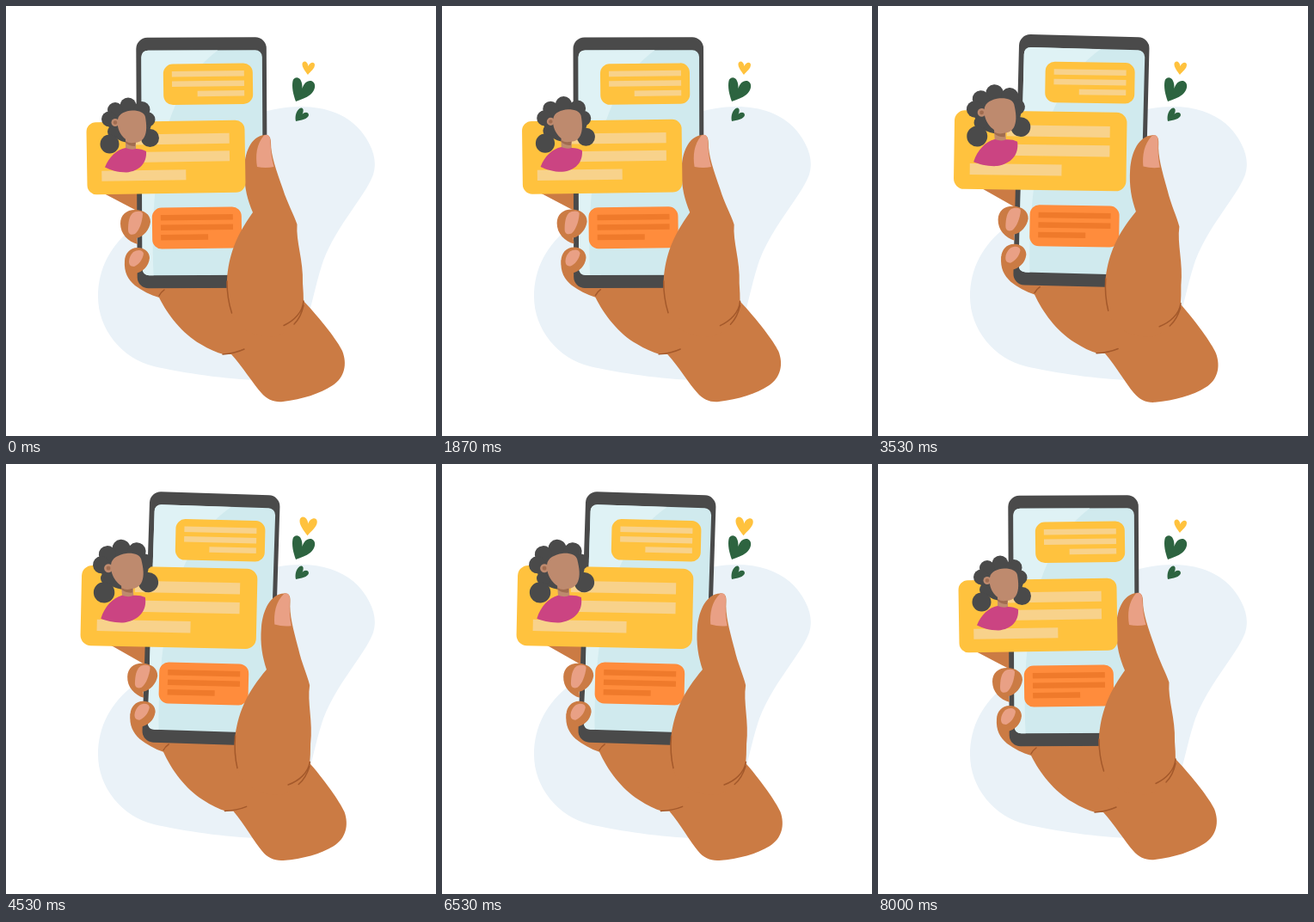
An HTML page that plays this animation: 500x500 px, repeating every 8.03 s.

```html
<!DOCTYPE html>
<html lang="en">
<head>
<meta charset="utf-8">
<title>Hand with chat phone</title>
<style>
  html, body { margin: 0; width: 100%; height: 100%; overflow: hidden; background: #fff; }
  svg { display: block; width: 100vw; height: 100vh; }
  .skin { fill: #cb7b44; }
  .nail { fill: #e9a085; }
  .line { fill: none; stroke: #a4592b; stroke-width: 1.5; stroke-linecap: round; }
  .dark { fill: #4a4a4a; }
  .yellow { fill: #ffc23e; }
  .pale { fill: #f8d28b; }
  .orange { fill: #ff8c3c; }
  .rust { fill: #ef7a2b; }
  .face { fill: #be8a6e; }
  .green { fill: #2d6440; }
</style>
</head>
<body>
<svg viewBox="0 0 500 500">
  <path fill="#eaf2f8" d="M290 126C345 108 392 118 414 147C427 164 432 181 427 196C418 221 385 254 369 296C360 322 356 350 340 400L290 435C245 433 198 425 172 419C135 410 107 376 107 338C107 305 122 277 150 256L250 200Z"/>

  <path class="green" d="M337 111C334 103 332 94 333.500 87C335 82 341 82 343 87C344.500 90 344.500 93 344.500 96C346 90 351 85.500 356 87.500C361 90 360 98 354 103C349 107 342 109 337 111Z"/>
  <path class="green" d="M337 134C335.500 128 338 120 343 118.500C346 118 346.500 122 344.500 126C347 123 352 123 352 127C351 131.500 343 133 337 134Z"/>
  <path id="heart" class="yellow" d="M351 80C348 76 344 71 344.500 67C345.500 62.500 351 64 351.500 70C353 65 359 64 359 68.500C359 73 354 76 351 80Z"/>

  <g id="hand">
    <path class="skin" d="M112 217L152 238L170 230V210H112Z"/>
    <path class="skin" d="M138 296C137 310 142 318 150 325C158 331 168 336 178 339C188 359 205 381 226 393C236 399 245 403 253 405L262 405C275 419 287 439 297 450C304 458 312 461 322 460C345 457 365 451 380 441C394 432 397 416 391 401C386 390 366 364 346 343L320 290L250 280L160 280Z"/>
    <path class="line" d="M178 337Q180 333 184 330M252 405Q266 404 277 399"/>

    <g transform="rotate(-.3 228 182)">
      <rect class="dark" x="152" y="36.500" width="151.500" height="291.500" rx="13"/>
      <rect x="158" y="51.500" width="140.500" height="261.500" rx="8" fill="#d0eaee"/>
      <path fill="#dff2f5" d="M166 51.500H247C195 90 166 165 171 313H166Q158 313 158 305V59.500Q158 51.500 166 51.500Z"/>
    </g>
    <g transform="rotate(-.8 235 90)">
      <rect class="yellow" x="183" y="67" width="104" height="47.500" rx="11"/>
      <path class="pale" d="M193 75.500h84v6.500h-84zM193 87h84v6.500h-84zM222.500 98.500h54.500v6.500h-54.500z"/>
    </g>
    <g transform="rotate(-.8 222 258)">
      <rect class="orange" x="170" y="234" width="104" height="48" rx="11"/>
      <path class="rust" d="M180 242.500h84v6.500h-84zM180 254h84v6.500h-84zM180 265.500h55v6.500h-55z"/>
    </g>

    <path class="skin" d="M133 253C133 243 140 237 150 237C160 237 168 242 168 251C167 260 160 268 152 270L153 277C142 274 133 265 133 253Z"/>
    <path class="nail" d="M147 241C151 238 159 238 159 242C158.500 251 155 261 150 265C145 267 142 265 142 260C142 252 143 245 147 241Z"/>
    <path class="skin" d="M138 297C138 288 144 281 153 281C162 281 167 287 167 293C166 303 159 309 151 311L153 321C144 316 138 307 138 297Z"/>
    <path class="nail" d="M148 286C153 283 159 283 160 288C159 295 154 301 149 303C144 303 143 300 143 297C143 293 145 289 148 286Z"/>
  </g>

  <g id="thumb">
    <path class="skin" d="M300 150C305 149 308 152 308 159C308 174 314 190 322 213C327 229 335 243 338.500 254C337 274 346 296 345 322Q346 334 346 346Q338 376 316 384Q284 388 266 366L262 357C258 344 256 332 257 318C259 290 267 268 287 240C281 226 277 211 277 192C277 170 285 152 300 150Z"/>
    <path class="nail" d="M300 150.500C306 148 307.500 153 307.500 160C308 170 309 178 311.500 187Q302 189 292 187C290 174 291 161 300 150.500Z"/>
    <path class="line" d="M257 320Q257 340 262.500 357M346 343C345 356 335 366 323 371.500M346 348Q343 362 335 370"/>
  </g>

  <g id="card">
    <g transform="rotate(-.9 186 176)">
      <rect class="yellow" x="94" y="134" width="184" height="84" rx="11"/>
      <path class="pale" d="M150 149h110v12h-110zM150 169.500h110v12h-110zM111 190.500h98v12h-98z"/>
    </g>
    <g id="avatar">
      <g id="hair" class="dark"><ellipse cx="144" cy="136" rx="25" ry="23"/></g>
      <path class="face" d="M139 152H151V167Q145 171 139 166Z"/>
      <path fill="#a06c50" d="M139 157Q145 161 151 158L150 163Q143 163 139 159Z"/>
      <circle class="face" cx="127" cy="135.500" r="4.500"/>
      <circle cx="127" cy="135.500" r="2.200" fill="#a06c50"/>
      <path class="face" d="M130 132C131 125 139 122 147 121.500C155 121.500 161 124 162 129C163.500 138 164 146 161 152C158 158 152 160 146 158C136 156 128 144 130 132Z"/>
      <path fill="#cb4482" d="M115 187.500C120 175 129 167 139 165Q146 168 151 166Q158 166 163 169C164 183 155 192 140 193.500C130 193.500 121 190.500 115 187.500Z"/>
    </g>
  </g>
</svg>
<script>
  const $ = id => document.getElementById(id);
  const LOOP = 8030, FRAME = 100 / 3, SWING = 1000;

  const curls = [[142, 116, 9.5], [127, 121, 9], [158, 120.5, 9.5], [120, 131.5, 9],
                 [165, 132, 8.5], [125, 146, 7], [120.5, 160.5, 11], [167.5, 153.5, 10.5]];
  for (const [cx, cy, r] of curls) {
    const c = document.createElementNS("http://www.w3.org/2000/svg", "circle");
    c.setAttribute("cx", cx);
    c.setAttribute("cy", cy);
    c.setAttribute("r", r);
    $("hair").append(c);
  }

  const turn = (deg, x, y) => `rotate(${deg} ${x} ${y})`;
  const grow = (s, x, y) => `translate(${x} ${y}) scale(${s}) translate(${-x} ${-y})`;
  const pose = (id, value) => $(id).setAttribute("transform", value);
  const wave = u => (1 - Math.cos(Math.PI * u)) / 2;

  function draw(ms) {
    const t = Math.floor((ms % LOOP + 4) / FRAME) * FRAME;
    const e = wave(t / SWING);
    const tilt = turn(3.85 * e, 295, 470);
    pose("hand", tilt);
    pose("thumb", turn(8.46 * e, 307, 435));
    pose("card", tilt + grow(1 + 0.2 * e, 256, 225));
    pose("avatar", turn(-12 * e, 142, 187));

    // The heart beats once during each outward swing, then rests.
    const phase = t % (2 * SWING) / SWING;
    const beat = phase < 1 ? wave(phase * 2) : 0;
    pose("heart", grow(1 + 0.4 * beat, 352, 71.5));
  }

  const start = performance.now();
  function tick() {
    draw(performance.now() - start);
    requestAnimationFrame(tick);
  }
  tick();
</script>
</body>
</html>
```
